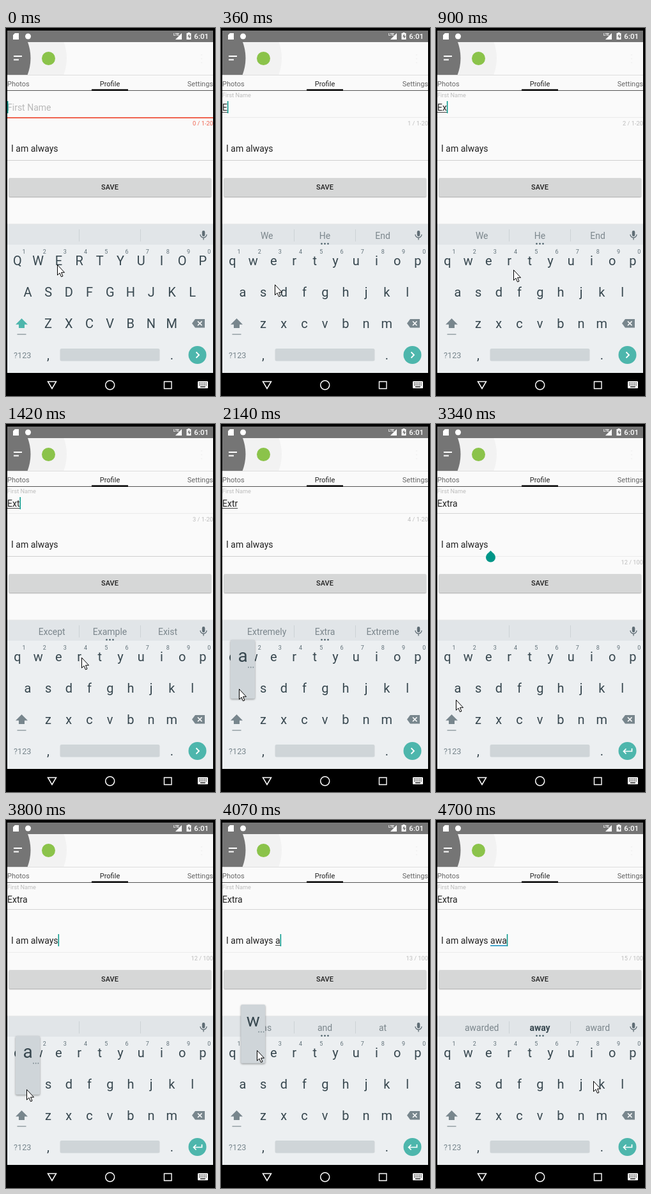
Recreate the animation shown at these times as an HTML page with a canvas. Size 327 by 574 pixels, loop 4800 ms.

```html
<!DOCTYPE html>
<html lang="en">
<head>
<meta charset="utf-8">
<title>Profile form</title>
<style>
  html, body { margin: 0; width: 100%; height: 100%; overflow: hidden; background: #000; }
  canvas { display: block; width: 327px; height: 574px; }
</style>
</head>
<body>
<canvas id="stage"></canvas>
<script>
const W = 327, H = 574, LOOP = 4800;
const TEAL = '#4db6ac', DEEP_TEAL = '#009688', RED = '#f06450';
const KEY = '#37474f', SOFT = '#78868d', INK = '#212121', FAINT = '#bdbdbd';
const canvas = document.getElementById('stage');
const ctx = canvas.getContext('2d');
const dpr = window.devicePixelRatio || 1;
canvas.width = W * dpr;
canvas.height = H * dpr;
ctx.scale(dpr, dpr);

// [time, pointer x, pointer y, changes]; pressed key lasts one step, the rest persists
const first = { name: '', bio: 'I am always', word: '', field: 1, caps: true, caret: true,
                handle: false, hints: [], bold: false };
const steps = [
  [0, 80, 369],
  [120, 81, 367, { press: 'E' }],
  [240, 81, 368, { name: 'E', caps: false }],
  [360, 84, 400, { hints: ['We', 'He', 'End'] }],
  [480, 91, 448],
  [630, 98, 458],
  [760, 97, 459],
  [900, 121, 377, { name: 'Ex' }],
  [1020, 141, 367, { hints: ['Except', 'Example', 'Exist'] }],
  [1150, 143, 364, { press: 't' }],
  [1270, 139, 364],
  [1420, 118, 364, { name: 'Ext' }],
  [1540, 114, 363, { press: 'r' }],
  [1680, 68, 389, { name: 'Extr' }],
  [1830, 43, 402, { hints: ['Extremely', 'Extra', 'Extreme'] }],
  [1990, 28, 413],
  [2140, 28, 413, { press: 'a', caret: false }],
  [2280, 28, 413, { name: 'Extra', caret: true }],
  [2400, 48, 360],
  [2520, 88, 262],
  [2660, 116, 196],
  [2780, 122, 200, { field: 2, hints: [], handle: true }],
  [2900, 126, 211],
  [3050, 84, 429],
  [3200, 40, 457, { caret: false }],
  [3340, 31, 430],
  [3500, 31, 423],
  [3660, 32, 421],
  [3800, 32, 420, { press: 'a', handle: false, caret: true }],
  [3930, 34, 412, { word: 'a', hints: ['as', 'and', 'at'] }],
  [4070, 56, 359, { press: 'w' }],
  [4190, 32, 408, { word: 'aw' }],
  [4460, 32, 413, { word: 'awa' }],
  [4580, 150, 410, { hints: ['awarded', 'away', 'award'], bold: true }],
  [4700, 246, 407]
];
let state = first;
const scenes = steps.map(([time, px, py, change]) =>
  state = { ...state, press: '', ...change, time, px, py });

const rows = [['qwertyuiop', 18, 363], ['asdfghjkl', 34, 412], ['zxcvbnm', 66, 461]];
const PITCH = 32.2;

function box(x, y, w, h, color) {
  ctx.fillStyle = color;
  ctx.fillRect(x, y, w, h);
}
function round(x, y, w, h, r, color) {
  ctx.fillStyle = color;
  ctx.beginPath();
  ctx.roundRect(x, y, w, h, r);
  ctx.fill();
}
function disc(x, y, r, color) {
  ctx.fillStyle = color;
  ctx.beginPath();
  ctx.arc(x, y, r, 0, 7);
  ctx.fill();
}
function text(s, x, y, size, color, align = 'left', weight = 400) {
  ctx.font = `${weight} ${size}px Roboto, sans-serif`;
  ctx.textAlign = align;
  ctx.fillStyle = color;
  ctx.fillText(s, x, y);
}
function width(s) {
  ctx.font = '400 14px Roboto, sans-serif';
  return ctx.measureText(s).width;
}
function fill(path, color, x = 0, y = 0) {
  ctx.save();
  ctx.translate(x, y);
  ctx.fillStyle = color;
  ctx.fill(new Path2D(path));
  ctx.restore();
}
function line(path, color, w = 1, x = 0, y = 0) {
  ctx.save();
  ctx.translate(x, y);
  ctx.strokeStyle = color;
  ctx.lineWidth = w;
  ctx.stroke(new Path2D(path));
  ctx.restore();
}
function shadow(blur, dy, alpha) {
  ctx.shadowColor = `rgba(0,0,0,${alpha})`;
  ctx.shadowBlur = blur * dpr;
  ctx.shadowOffsetY = dy * dpr;
}

function drawStatus() {
  box(2, 4, 322, 18, '#757575');
  fill('M14 8h6v10h-9v-7z', '#fff');
  disc(34.5, 13, 4.5, '#fff');
  text('LTE', 262, 12, 5.5, '#fff', 'left', 700);
  fill('M275 8v10h-10z', '#fff');
  fill('M284.500 7h3v1h2v10h-7v-10h2z', '#fff');
  fill('M287 9l-3 4.500h2v3.500l3-4.500h-2z', '#757575');
  text('6:01', 317, 17, 11.5, '#fff', 'right', 500);
}

function drawHeader() {
  ctx.save();
  ctx.beginPath();
  ctx.rect(2, 22, 322, 51);
  ctx.clip();
  disc(23, 47, 72, '#f2f2f2');
  disc(-33.5, 47, 72, '#757575');
  ctx.restore();
  box(12, 43, 13, 2, '#fff');
  box(12, 48.5, 8, 2, '#fff');
  disc(66.5, 47.5, 10.5, '#8bc34a');
  for (const y of [42, 48, 54]) disc(306, y, 1, '#f0f0f0');
  box(2, 73, 322, 1, '#dedede');
  text('Photos', 2, 90.5, 11, '#666');
  text('Profile', 162.5, 90.5, 11, INK, 'center');
  text('Settings', 324, 90.5, 11, '#666', 'right');
  box(2, 97, 322, 1, '#555');
  box(134, 95.5, 57, 2.500, '#000');
}

function drawForm(s) {
  const onName = s.field === 1, empty = !s.name;
  if (empty) {
    text('First Name', 2, 129, 14, '#b8b8b8');
  } else {
    text('First Name', 2, 107.5, 9.2, FAINT);
    text(s.name, 2, 129, 14, INK);
  }
  if (empty) box(2, 139, 322, 2, RED);
  else box(2, 139, 322, 1, onName ? '#ebebeb' : '#d4d4d4');
  if (onName) {
    text(`${s.name.length} / 1-20`, 324, 152, 9.3, empty ? RED : FAINT, 'right');
    if (!empty) box(2, 131, width(s.name), 1, '#444');
  }

  const bio = s.word ? `${s.bio} ${s.word}` : s.bio;
  text(bio, 8, 193, 14, INK);
  if (s.word) {
    const x = 8 + width(s.bio + ' ');
    box(x, 195, width(s.word), s.bold ? 2 : 1, s.bold ? '#4aa9cf' : '#444');
  }
  box(2, 206, 322, 1, onName ? '#cfcfcf' : '#ebebeb');
  if (!onName) text(`${bio.length + (s.word ? 0 : 1)} / 100`, 324, 218.5, 9.3, FAINT, 'right');

  if (s.caret) {
    const x = onName ? 2 + width(s.name) : 8 + width(bio);
    box(x, onName ? 114 : 178, 1.5, 19, DEEP_TEAL);
  }
  if (s.handle) {
    disc(85.5, 208, 7.5, DEEP_TEAL);
    fill('M85.500 197.500L91.500 203.500H79.500Z', DEEP_TEAL);
  }

  ctx.save();
  shadow(2, 1, .35);
  round(4.5, 234, 316.5, 29, 1.5, '#d6d7d7');
  ctx.restore();
  text('SAVE', 162.5, 252.3, 11, INK, 'center', 500);
}

function drawHints(s) {
  box(2, 305, 322, 1, '#ececec');
  box(2, 306, 322, 32, '#e1e5e8');
  box(114, 314, 1, 19, '#cdd2d5');
  box(210, 314, 1, 19, '#cdd2d5');
  s.hints.forEach((hint, i) => {
    const strong = s.bold && i === 1;
    text(hint, [71.7, 162.5, 253][i], 329, 14, strong ? KEY : '#7b868c', 'center', strong ? 700 : 400);
  });
  if (s.hints.length) for (const x of [157.5, 162.5, 167.5]) disc(x, 336.5, 1.3, '#455a64');
  round(306.8, 316, 4.5, 9, 2.2, '#5f6d75');
  line('M304 322a5 5 0 0 0 10 0M309 327v3.500', '#5f6d75', 1.3);
}

function drawKeys(s) {
  box(2, 338, 322, 200, '#eceff1');
  for (const [letters, x, y] of rows)
    [...letters].forEach((c, i) =>
      text(s.caps ? c.toUpperCase() : c, x + i * PITCH, y + 7, 20, KEY, 'center'));
  for (let i = 0; i < 10; i++)
    text((i + 1) % 10, 28 + i * PITCH, 352, 9, '#607078', 'center');

  fill('M24.500 453l9.500 9.500h-5v5.500h-9v-5.500h-5z', s.caps ? TEAL : SOFT);
  box(17.5, 477, 14, 1.5, '#96a1a6');
  fill('M296 454h15v13.500h-15l-5-6.750z', SOFT);
  line('M300 457.500l6.500 6.500m0-6.500l-6.500 6.500', '#fff', 1.6);
  text('?123', 25.7, 514.5, 12.7, SOFT, 'center');
  text(',', 66, 517, 20, KEY, 'center');
  text('.', 259.5, 517, 20, KEY, 'center');
  round(84.5, 500, 156, 19.5, 2.5, '#cfd5d8');
  disc(299.5, 510, 14, TEAL);
  if (s.field === 1) line('M297.500 505.500l4.500 4.500l-4.500 4.500', '#fff', 1.8);
  else line('M306.500 506v4.500h-13m4-4l-4 4l4 4', '#fff', 1.7);
}

function drawPress(key) {
  const low = key.toLowerCase();
  const [letters, start, mid] = rows.find(r => r[0].includes(low));
  const x = start + letters.indexOf(low) * PITCH, y = mid - 75;
  ctx.save();
  shadow(3, 1, .4);
  round(x - 19, y, 38, 91.5, 2, '#cfd5d9');
  ctx.restore();
  text(key, x, y + 34, 28, KEY, 'center');
  for (let i = 0; i < 3; i++) disc(x + 9 + i * 3.7, y + 42.5, .9, SOFT);
}

function drawNav() {
  box(0, 538, W, 36, '#000');
  line('M65.500 551.500h13l-6.500 11z', '#fff', 1.5);
  line('M155.700 557a7 7 0 1 0 14 0a7 7 0 1 0-14 0z', '#fff', 1.5);
  line('M247.500 551.500h11.500v11h-11.500z', '#fff', 1.4);
  round(300, 551, 16, 11, 1, '#fff');
  for (let r = 0; r < 2; r++)
    for (let i = 0; i < 5; i++) box(302 + i * 2.6, 553 + r * 3, 1.4, 1.4, '#000');
  box(304, 559, 8, 1.3, '#000');
}

function drawPointer(x, y) {
  const arrow = 'M.5 .5V16.500L4 13.200L6.500 19L9 18L6.500 12.300H11.500Z';
  fill(arrow, '#fff', x, y);
  line(arrow, '#000', 1, x, y);
}

function draw(s) {
  box(0, 0, W, H, '#000');
  box(2, 4, 322, 534, '#fafafa');
  drawStatus();
  drawHeader();
  drawForm(s);
  drawHints(s);
  drawKeys(s);
  if (s.press) drawPress(s.press);
  drawNav();
  drawPointer(s.px, s.py);
}

const start = performance.now();
function tick() {
  const t = (performance.now() - start) % LOOP;
  draw(scenes.findLast(s => s.time <= t));
  requestAnimationFrame(tick);
}
tick();
</script>
</body>
</html>
```
